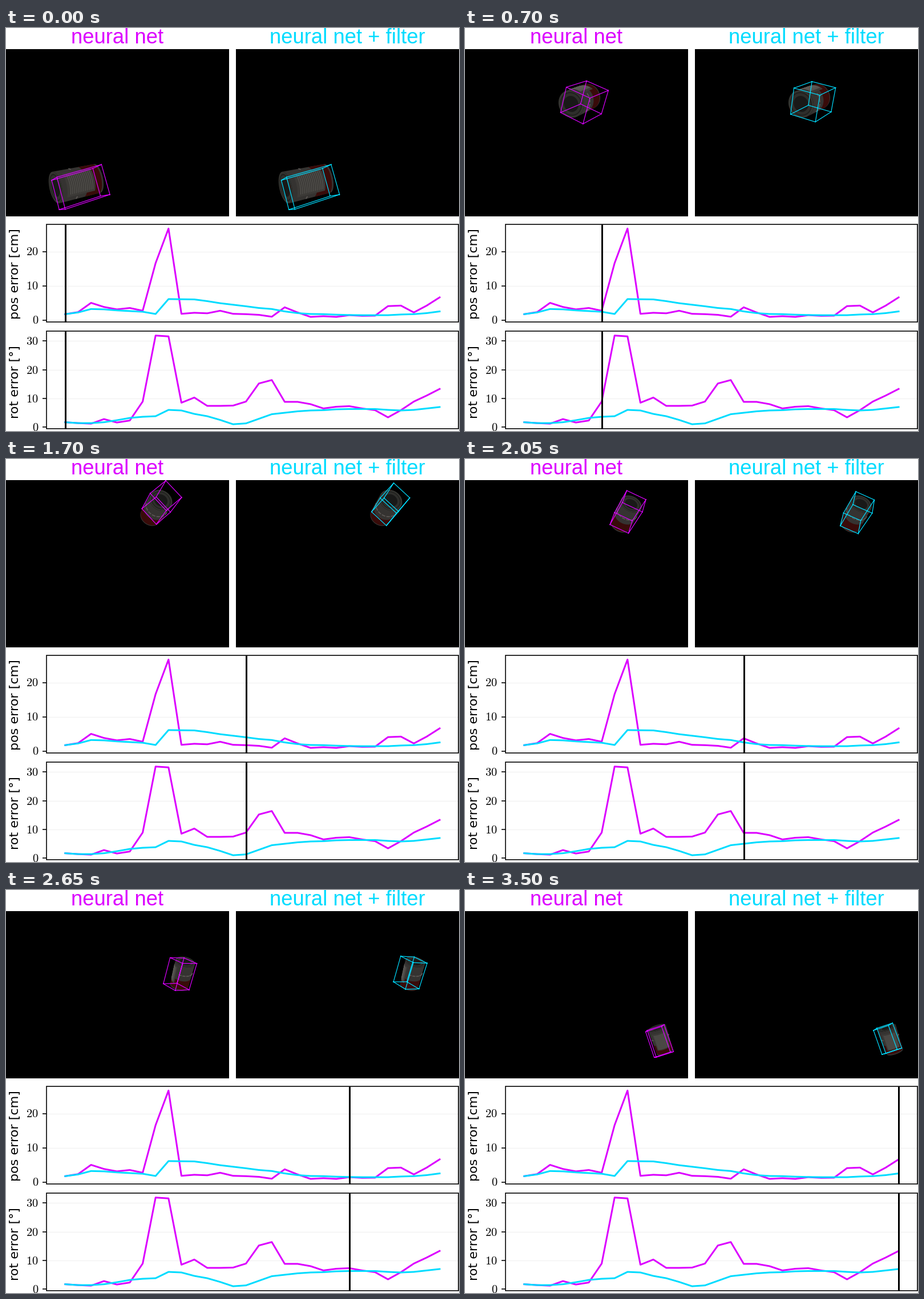
Write a matplotlib script that moves like this. It is 794 by 706 pixels and loops after 3600 ms.

```python
import itertools

import matplotlib.pyplot as plt
import numpy as np
from matplotlib.animation import FuncAnimation
from matplotlib.patches import Polygon, Rectangle

W, H, DPI = 794, 706, 64
PT = 72 / DPI                        # points per pixel
MAGENTA, CYAN = "#dc00ff", "#00dcff"
STEPS, TICKS = 30, 72

plt.rcParams["mathtext.fontset"] = "cm"

# Error curves, one value per time step
POS_NET = [1.7, 2.3, 5, 3.8, 3.1, 3.5, 2.7, 16.6, 26.7, 1.8, 2.1, 1.95, 2.7, 1.8, 1.7,
           1.5, .95, 3.7, 2.2, .9, 1.1, .9, 1.4, 1.2, 1.25, 4.05, 4.2, 2.2, 4.2, 6.6]
POS_FILTER = [1.7, 2.2, 3.2, 3.1, 2.8, 2.6, 2.4, 1.75, 6.1, 6.05, 6, 5.5, 4.9, 4.45, 4,
              3.5, 3.2, 2.5, 2, 1.75, 1.7, 1.55, 1.45, 1.4, 1.4, 1.4, 1.6, 1.7, 2, 2.5]
ROT_NET = [1.7, 1.4, 1.2, 2.8, 1.6, 2.3, 8.9, 31.9, 31.6, 8.5, 10.3, 7.4, 7.4, 7.5, 8.9,
           15.2, 16.4, 8.8, 8.8, 8, 6.5, 7.1, 7.3, 6.5, 5.9, 3.4, 5.9, 8.9, 11, 13.3]
ROT_FILTER = [1.7, 1.4, 1.4, 1.7, 2.4, 3.2, 3.6, 3.8, 6, 5.8, 4.6, 3.8, 2.5, 1, 1.3,
              2.9, 4.5, 5, 5.5, 5.8, 5.9, 6.2, 6.3, 6.3, 6.3, 6, 5.8, 6, 6.5, 7]

# Key poses of the boxes: centre, two short edges, long edge (pixels)
KEYS = np.array([0, 6, 9, 14, 19, 24, 29])
NET_BOX = [
    (129.5, 278.5, 13, -4, 14, 52, 75, -23),
    (209.6, 127.9, 11.2, -42.7, 38.8, 18.2, 33.8, -14.2),
    (237.7, 93.5, -1.2, -43.5, 43.5, -1.7, 3.3, 5),
    (271, 77.1, -26.5, -28.3, 26, -21.8, -17, 26.3),
    (292.5, 111, -32.5, -7.5, -5.5, -17.5, -20, 43),
    (312.4, 175.5, -15.7, 4, -28.3, -4.7, -4.7, 46),
    (339.6, 264.7, 4, -1.7, -29, 9.5, 15.7, 46),
]
FILTER_BOX = [
    (129, 278.5, 13, -4, 14, 52, 75, -23),
    (207.5, 126.8, 7, -44, 42.5, 12, 29.5, -14.5),
    (234.5, 94.3, -5.5, -41.5, 41.5, -6.5, 3, 5),
    (269.4, 80.3, -27, -25, 22.5, -25.5, -17.3, 24),
    (292, 110.8, -31.5, -7.5, -7, -18, -20.5, 42.5),
    (313, 172.5, -16, 3, -28, -6.5, -6, 45),
    (336.5, 260.5, 7, -3, -27, 9, 15.5, 43),
]
# Key poses of the can: centre, axis from lid to base, radius
CAN = [
    (123, 271, 73, -16, 27), (201, 126, 31, -13, 23.5), (228, 93, 3, 1, 22.5),
    (262, 86, -18, 28, 20), (293, 111, -17, 40, 18), (318, 176, -5, 42, 16),
    (343, 262, 14, 42, 15.5),
]

EYE = np.array([195.5, 183])         # principal point of the camera
FOCAL = 540
ASPECT = 1.5


def spline(rows):
    """Cubic Hermite curve through the key rows, sampled at each step."""
    rows = np.array(rows, float)
    slope = np.gradient(rows, KEYS, axis=0, edge_order=2)
    out = []
    for i in range(STEPS):
        j, f = segment(i)
        h = KEYS[j + 1] - KEYS[j]
        out.append((1 + 2 * f) * (1 - f) ** 2 * rows[j] + f * (1 - f) ** 2 * h * slope[j]
                   + f * f * (3 - 2 * f) * rows[j + 1] - f * f * (1 - f) * h * slope[j + 1])
    return np.array(out)


def segment(i):
    j = min(np.searchsorted(KEYS, i, "right") - 1, len(KEYS) - 2)
    return j, (i - KEYS[j]) / (KEYS[j + 1] - KEYS[j])


def fit_pose(row):
    """Scale, rotation and leftover shear of a box seen in perspective."""
    centre = np.array(row[:2]) - EYE
    seen = np.array(row[2:]).reshape(3, 2).T / [1, 1, ASPECT]
    flat = seen.copy()
    for _ in range(8):
        scale = np.sqrt((flat ** 2).sum() / 2)
        depth = np.cross(flat[0], flat[1]) / scale
        flat = seen + np.outer(centre, depth) / FOCAL
    u, _, vt = np.linalg.svd(np.vstack([flat, depth]))
    rot = u @ vt
    return scale, rot, flat - scale * rot[:2]


def slerp(a, b, f):
    rel = b @ a.T
    angle = np.arccos(np.clip((np.trace(rel) - 1) / 2, -1, 1))
    if angle < 1e-6:
        return a
    k = (rel - rel.T) / (2 * np.sin(angle))
    return (np.eye(3) + np.sin(f * angle) * k + (1 - np.cos(f * angle)) * k @ k) @ a


CORNERS = np.array(list(itertools.product((-.5, .5), repeat=3))) * [1, 1, ASPECT]
EDGES = [(a, b) for a in range(8) for b in range(a + 1, 8) if bin(a ^ b).count("1") == 1]
GAP = np.full((1, 2), np.nan)


class Box:
    def __init__(self, rows, size):
        self.centres = spline([r[:2] for r in rows])
        self.poses = [fit_pose(r) for r in rows]
        self.size = size

    def wire(self, i):
        j, f = segment(i)
        (s0, r0, e0), (s1, r1, e1) = self.poses[j], self.poses[j + 1]
        m = (s0 + f * (s1 - s0)) * slerp(r0, r1, f)
        m[:2] += e0 + f * (e1 - e0)
        p = CORNERS @ m.T * self.size[i]
        xy = EYE + (self.centres[i] - EYE + p[:, :2]) / (1 + p[:, 2:] / FOCAL)
        return np.vstack([np.vstack([xy[[a, b]], GAP]) for a, b in EDGES])


can_path = spline(CAN)


def can_surface(i):
    """Map (t along the axis, angle) on the can to pixels; 0..180 degrees is visible."""
    x, y, wx, wy, r = can_path[i]
    length = np.hypot(wx, wy) + 1e-6
    e = np.array([wx, wy]) / length
    n = np.array([-e[1], e[0]])
    tilt = np.sqrt(max(1 - (length / (3 * r)) ** 2, .01))

    def point(t, deg, k=1.0):
        a = np.radians(np.atleast_1d(deg))[:, None]
        rad = r * k * (1.05 - .1 * t)
        return (x, y) + e * length * (t - .5) + rad * (np.cos(a) * n + np.sin(a) * tilt * e)

    return point


fig = plt.figure(figsize=(W / DPI, H / DPI), dpi=DPI, facecolor="white")
ax = fig.add_axes([0, 0, 1, 1])
ax.set_xlim(0, W)
ax.set_ylim(H, 0)
ax.axis("off")


class View:
    """Camera panel with the can and one predicted box."""

    def __init__(self, left, color, box):
        self.shift, self.box = np.array([left + .5, .5]), box
        self.frame = Rectangle((left, 37), 391, 293, fc="black", lw=0)
        ax.add_patch(self.frame)
        self.body, self.red, self.panel, self.lid, *self.rings = [
            self.shape(c) for c in ("#353331", "#390b09", "#3c3a37", "#33332f",
                                    "#1f1f1d", "#2e2e2b", "#191918")]
        self.print = self.line("#5b5955", .9)
        self.letters = self.line("#5a5653", 1.8)
        self.wire = self.line(color, 1.2)

    def shape(self, color):
        p = ax.add_patch(Polygon(np.zeros((3, 2)), fc=color, lw=0))
        p.set_clip_path(self.frame)
        return p

    def line(self, color, width):
        ln, = ax.plot([], [], color=color, lw=width * PT)
        ln.set_clip_path(self.frame)
        return ln

    def set_line(self, ln, parts):
        pts = np.vstack(parts) if parts else GAP
        ln.set_data(*(pts + self.shift).T)

    def show(self, i):
        at = can_surface(i)

        def band(patch, t0, t1, a0=0, a1=180):
            a = np.linspace(np.clip(a0, 0, 180), np.clip(a1, 0, 180), 24)
            patch.set_xy(np.vstack([at(t0, a), at(t1, a[::-1])]) + self.shift)

        def arcs(rows):
            parts = []
            for t, a0, a1 in rows:
                a0, a1 = np.clip([a0, a1], 0, 180)
                if a1 > a0:
                    parts += [at(t, np.linspace(a0, a1, 8)), GAP]
            return parts

        spin = (90 + (i - STEPS + 1) * 360 / 29 + 90) % 360 - 90
        band(self.body, 0, 1)
        band(self.red, .6, .96)
        band(self.panel, .12, .8, spin - 50, spin + 50)
        ring = np.linspace(0, 360, 48)
        for patch, k in zip([self.lid, *self.rings], (1, .86, .78, .58)):
            patch.set_xy(at(0, ring, k) + self.shift)
        self.set_line(self.print, arcs((t, spin - 38, spin + 38)
                                       for t in np.linspace(.2, .74, 13)))
        marks = [(spin + 70 + 24 * k) % 360 for k in range(10)]
        self.set_line(self.letters, arcs((.38, a, a + 13) for a in marks))
        self.set_line(self.wire, [self.box.wire(i)])


def step_x(i):
    return 103.8 + 22.63 * i


def chart(top, zero, unit, ticks, label, label_y, net, filtered):
    left, right, bottom = 71, 793, top + 171
    for v in ticks:
        y = zero - unit * v
        ax.plot([left, right], [y, y], color="#f3f3f3", lw=1.4 * PT)
        ax.plot([64, left], [y, y], color="black", lw=1.6 * PT, solid_capstyle="butt")
        ax.text(57, y + 7, f"${v}$", size=20.5 * PT, ha="right", va="baseline")
    x = step_x(np.arange(STEPS))
    for data, color in ((net, MAGENTA), (filtered, CYAN)):
        ax.plot(x, zero - unit * np.array(data), color=color, lw=3 * PT,
                solid_joinstyle="round")
    cursor, = ax.plot([], [], color="black", lw=3 * PT, solid_capstyle="butt")
    cursor.set_ydata([top, bottom])
    ax.add_patch(Rectangle((left, top), right - left, bottom - top, fill=False,
                           ec="black", lw=1.6 * PT, zorder=3))
    ax.text(16, label_y, label, size=22.2 * PT, rotation=90, family="DejaVu Sans",
            ha="center", va="center")
    return cursor


for x, title, color in ((195, "neural net", MAGENTA), (598.5, "neural net + filter", CYAN)):
    ax.text(x, 27, title, size=36.5 * PT, color=color, family="Liberation Sans",
            ha="center", va="baseline")

# Large position errors lie along the depth, so the box looks smaller
pos = np.array(POS_NET)
net_size = np.where(pos > 10, 1 / (1 + pos / 78), 1)
views = [View(0, MAGENTA, Box(NET_BOX, net_size)),
         View(403, CYAN, Box(FILTER_BOX, np.ones(STEPS)))]
cursors = [
    chart(343.5, 511.5, 6.0, (0, 10, 20), "pos error [cm]", 430.5, POS_NET, POS_FILTER),
    chart(531, 699.2, 5.03, (0, 10, 20, 30), "rot error [°]", 620, ROT_NET, ROT_FILTER),
]


def update(tick):
    i = (5 * tick + 2) // 12         # 30 steps spread over 72 ticks
    for view in views:
        view.show(i)
    for cursor in cursors:
        cursor.set_xdata([step_x(i)] * 2)
    return []


anim = FuncAnimation(fig, update, frames=TICKS, interval=50, repeat=True, repeat_delay=0,
                     init_func=lambda: update(0))
plt.show()
```
